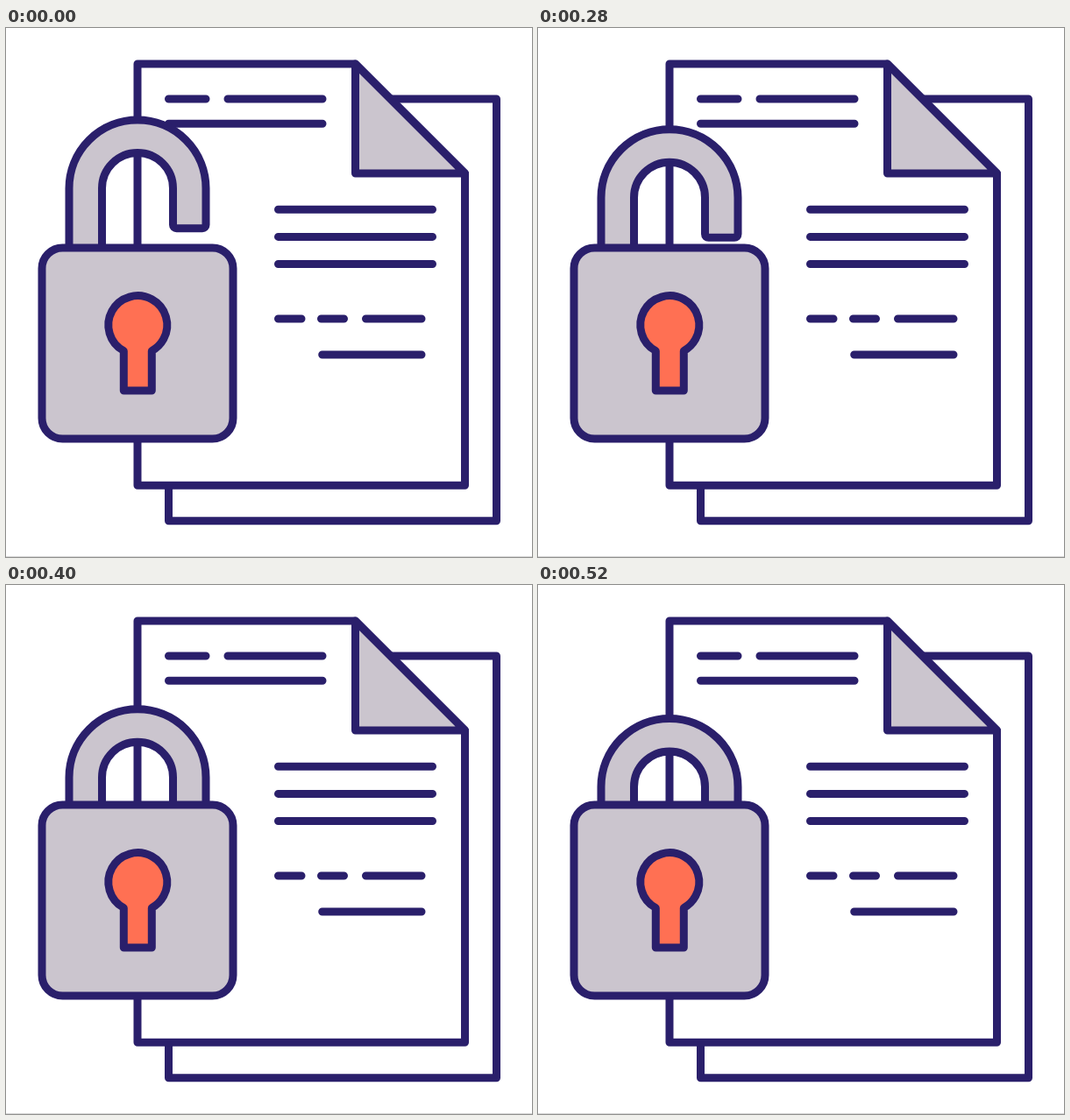
Recreate the animation shown at these times as an HTML page with a canvas. Size 600x604 px, loop 1 s.

```html
<!DOCTYPE html>
<html lang="en">
<head>
<meta charset="utf-8">
<title>Locking documents</title>
<style>
  html, body { margin: 0; width: 100%; height: 100%; overflow: hidden; background: #fff; }
  canvas { display: block; }
</style>
</head>
<body>
<canvas id="stage" width="600" height="604"></canvas>
<script>
const ctx = document.getElementById('stage').getContext('2d');
const INK = '#2a1f6b', GREY = '#cbc5ce', CORAL = '#ff7053', WHITE = '#fff';
const LOOP = 1000, START = 200, STEP = 40, STEPS = 9, TRAVEL = 47.4;

const clamp = (v, lo, hi) => Math.max(lo, Math.min(hi, v));
const easeInOut = p => p - 0.125 * Math.sin(2 * Math.PI * p);

function poly(...points) {
  const path = new Path2D();
  for (const [x, y] of points) path.lineTo(x, y);
  path.closePath();
  return path;
}

function page(left, top, right, bottom) {
  return poly([left, top], [right, top], [right, bottom], [left, bottom]);
}

function textLines() {
  const path = new Path2D();
  const dash = (y, from, to) => {
    path.moveTo(from, y);
    path.lineTo(to, y);
  };
  dash(81, 185.5, 228);
  dash(81, 253, 361);
  dash(109.3, 185.5, 361);
  for (let i = 0; i < 3; i++) dash(207.3 + 31.1 * i, 310.5, 486.5);
  dash(332, 310.5, 337);
  dash(332, 359.5, 385.5);
  dash(332, 410.5, 474);
  dash(373, 360.7, 474);
  return path;
}

function shackle() {
  const path = new Path2D();
  const cx = 150, cy = 183, outer = 78, inner = 40.5, foot = 228.7, hidden = 270;
  path.moveTo(cx - outer, hidden);
  path.arc(cx, cy, outer, Math.PI, 0);
  path.arcTo(cx + outer, foot, cx + inner, foot, 4);
  path.arcTo(cx + inner, foot, cx + inner, cy, 4);
  path.arc(cx, cy, inner, 0, Math.PI, true);
  path.lineTo(cx - inner, hidden);
  path.closePath();
  return path;
}

function lockBody() {
  const path = new Path2D();
  path.roundRect(41, 251, 218, 218, 23.5);
  return path;
}

function keyhole() {
  const path = new Path2D();
  const cx = 150.3, cy = 339.2, r = 33.5, half = 16, bottom = 414;
  const a = Math.acos(half / r);
  path.arc(cx, cy, r, Math.PI - a, a);
  path.lineTo(cx + half, bottom);
  path.lineTo(cx - half, bottom);
  path.closePath();
  return path;
}

const shapes = {
  back: page(185.5, 81, 559.5, 562.7),
  front: poly([150, 41], [398.5, 41], [523.5, 166], [523.5, 522.3], [150, 522.3]),
  fold: poly([398.5, 41], [523.5, 166], [398.5, 166]),
  lines: textLines(),
  shackle: shackle(),
  body: lockBody(),
  keyhole: keyhole()
};

function paint(path, fill) {
  if (fill) {
    ctx.fillStyle = fill;
    ctx.fill(path);
  }
  ctx.stroke(path);
}

function draw(t) {
  const step = clamp(Math.floor((t - START) / STEP) + 1, 0, STEPS);

  ctx.fillStyle = WHITE;
  ctx.fillRect(0, 0, 600, 604);
  ctx.fillStyle = '#d9d9d9';
  ctx.fillRect(0, 603, 600, 1);

  ctx.strokeStyle = INK;
  ctx.lineWidth = 9;
  ctx.lineJoin = ctx.lineCap = 'round';

  paint(shapes.back, WHITE);
  paint(shapes.front, WHITE);
  paint(shapes.fold, GREY);
  paint(shapes.lines);

  ctx.save();
  ctx.translate(0, TRAVEL * easeInOut(step / STEPS));
  paint(shapes.shackle, GREY);
  ctx.restore();

  paint(shapes.body, GREY);
  paint(shapes.keyhole, CORAL);
}

const origin = performance.now();
function tick() {
  draw((performance.now() - origin) % LOOP);
  requestAnimationFrame(tick);
}
tick();
</script>
</body>
</html>
```
